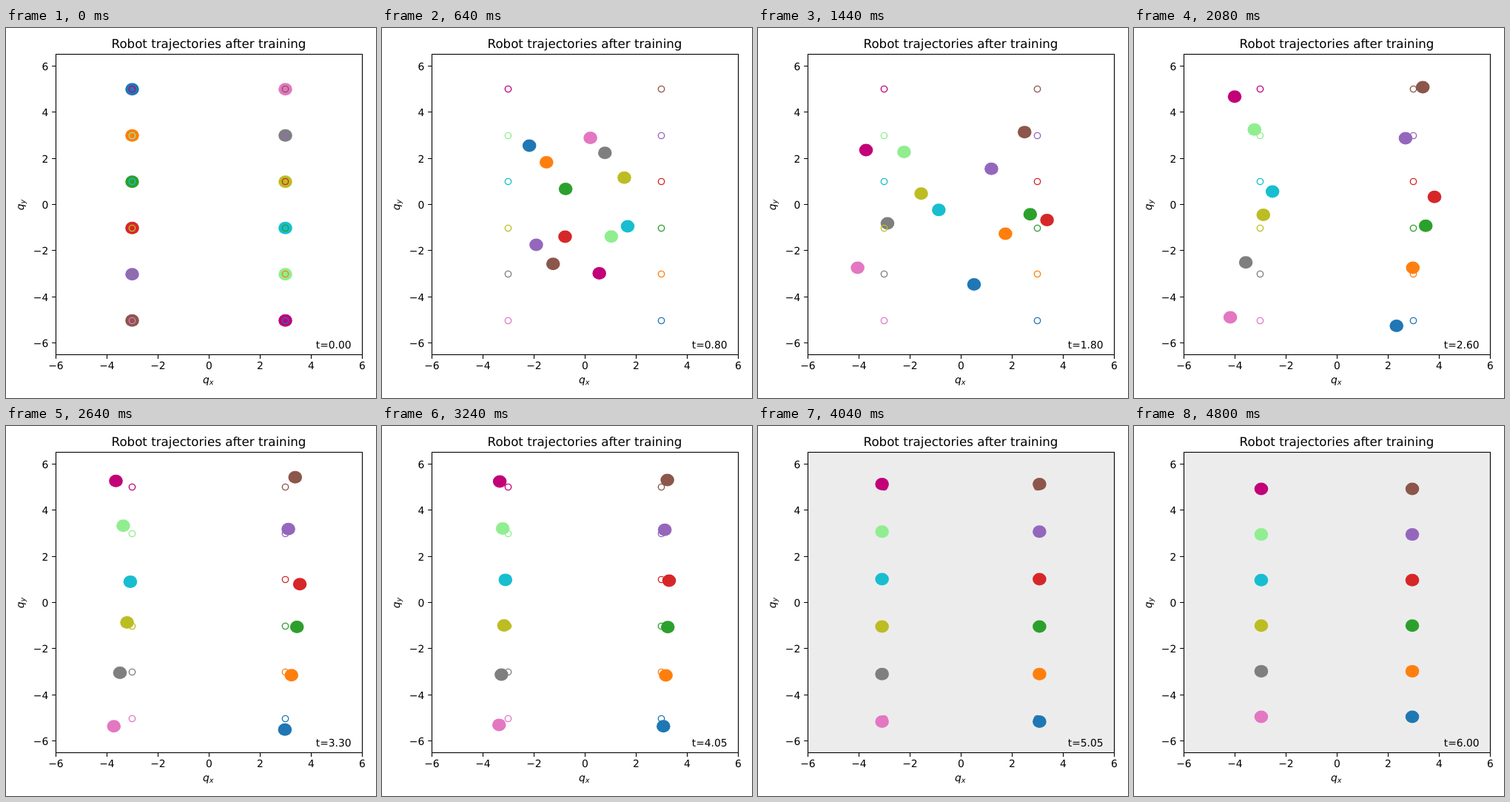
Recreate the animation shown at these times as an HTML page. Size 500 by 500 pixels, loop 4840 ms.

```html
<!DOCTYPE html>
<html lang="en">
<head>
<meta charset="utf-8">
<title>Robot trajectories</title>
<style>
  html, body { margin: 0; width: 100%; height: 100%; overflow: hidden; background: #fff; }
  svg { display: block; width: 100vw; height: 100vh; }
  text {
    font: 13.89px "DejaVu Sans", sans-serif; fill: #000;
    white-space: pre; text-rendering: geometricPrecision;
  }
  .title { font-size: 16.67px; }
  .math { font-style: oblique; }
  .sub { font-size: 9.72px; }
  .line { fill: none; stroke: #000; stroke-width: 1.1; }
</style>
</head>
<body>
<svg id="plot" viewBox="0 0 500 500"></svg>
<script>
const STEP_MS = 40, STEPS = 121, DT = 0.05, SHADE_STEP = 100;
const KNOTS = [0, 0.8, 1.8, 2.6, 4.05, 5.05, 6];

// Colour and the two points (x, y) passed while crossing, in plot units.
const ROBOTS = [
  ['#1f77b4', -2.17, 2.56, 0.52, -3.44],
  ['#ff7f0e', -1.5, 1.84, 1.75, -1.25],
  ['#2ca02c', -0.75, 0.69, 2.72, -0.41],
  ['#d62728', -0.77, -1.38, 3.38, -0.66],
  ['#9467bd', -1.9, -1.73, 1.2, 1.56],
  ['#8c564b', -1.24, -2.55, 2.5, 3.15],
  ['#e377c2', 0.22, 2.9, -4.04, -2.72],
  ['#7f7f7f', 0.79, 2.25, -2.87, -0.8],
  ['#bcbd22', 1.55, 1.18, -1.55, 0.49],
  ['#17becf', 1.68, -0.93, -0.86, -0.22],
  ['#90ee90', 1.04, -1.37, -2.22, 2.29],
  ['#c20078', 0.57, -2.96, -3.71, 2.37]
];

const px = x => 274 + 34.5 * x;
const py = y => 239 - 31.23 * y;
const plot = document.getElementById('plot');

function add(tag, attrs, content = '') {
  const el = document.createElementNS('http://www.w3.org/2000/svg', tag);
  for (const key in attrs) el.setAttribute(key, attrs[key]);
  el.textContent = content;
  return plot.appendChild(el);
}

function label(content, x, y, anchor = 'middle', cls = '') {
  return add('text', { x, y, 'text-anchor': anchor, class: cls }, content);
}

function mathLabel(sub, transform) {
  add('text', { x: 0, y: 0, class: 'math', transform }, 'q');
  add('text', { x: 8.8, y: 2.2, class: 'math sub', transform }, sub);
}

// Cubic spline that starts at rest and ends with zero curvature.
function spline(values) {
  const last = KNOTS.length - 1;
  const h = [], d = [], m = KNOTS.map(() => 0);
  for (let i = 0; i < last; i++) {
    h[i] = KNOTS[i + 1] - KNOTS[i];
    d[i] = (values[i + 1] - values[i]) / h[i];
  }
  for (let pass = 0; pass < 40; pass++) {
    for (let i = 1; i < last; i++) {
      const a = 1 / h[i - 1], b = 1 / h[i];
      m[i] = (3 * (a * d[i - 1] + b * d[i]) - a * m[i - 1] - b * m[i + 1]) / (2 * (a + b));
    }
    m[last] = (3 * d[last - 1] - m[last - 1]) / 2;
  }
  return t => {
    let i = 0;
    while (i < last - 1 && t >= KNOTS[i + 1]) i++;
    const u = (t - KNOTS[i]) / h[i], v = 1 - u;
    return values[i] * v + values[i + 1] * u
      + h[i] * u * v * ((m[i] - d[i]) * v + (d[i] - m[i + 1]) * u);
  };
}

// Moves from start to -start: the remaining share of the way goes from 1
// through both crossing points, overshoots slightly and settles.
function travel(start, early, mid) {
  const share = v => (v + start) / (2 * start);
  const late = 0.52 * share(mid) - 0.105;
  const left = spline([1, share(early), share(mid), late, 0.15 * late - 0.03, -0.014, 0.007]);
  return t => start * (2 * left(t) - 1);
}

const face = add('rect', { x: 67, y: 35, width: 415, height: 407, fill: '#fff' });

const robots = ROBOTS.map(([color, x1, y1, x2, y2], i) => {
  const startX = i < 6 ? -3 : 3, startY = 5 - 2 * (i % 6);
  return {
    color, startX, startY,
    x: travel(startX, x1, x2),
    y: travel(startY, y1, y2),
    disc: add('ellipse', { rx: 9.3, ry: 8.5, fill: color })
  };
});

for (const { color, startX, startY } of robots) {
  add('circle', {
    cx: px(-startX), cy: Math.floor(py(-startY)) + 0.5, r: 4.17,
    fill: 'none', stroke: color, 'stroke-width': 1.39
  });
}

add('rect', { x: 67.5, y: 35.5, width: 414, height: 406, class: 'line' });
for (let v = -6; v <= 6; v += 2) {
  const name = String(v).replace('-', '\u2212');
  const x = px(v) + 0.5, y = Math.ceil(py(v) - 0.5) - 0.5;
  add('path', { d: `M${x} 442v4.9M67 ${y}h-4.9`, class: 'line' });
  label(name, px(v) + 0.4, 461);
  label(name, 57.3, Math.round(py(v) + 5), 'end');
}
label('Robot trajectories after training', 274, 27, 'middle', 'title');
mathLabel('x', 'translate(266 480)');
mathLabel('y', 'translate(23.5 246.3) rotate(-90)');
const clock = label('', 418.7, 433, 'start');

function draw(step) {
  const t = step * DT;
  face.setAttribute('fill', step >= SHADE_STEP ? '#ececec' : '#fff');
  clock.textContent = 't=' + t.toFixed(2);
  for (const r of robots) {
    r.disc.setAttribute('cx', px(r.x(t)));
    r.disc.setAttribute('cy', py(r.y(t)));
  }
}

const start = performance.now();
function tick() {
  draw(Math.floor((performance.now() - start) / STEP_MS) % STEPS);
  requestAnimationFrame(tick);
}
tick();
</script>
</body>
</html>
```
